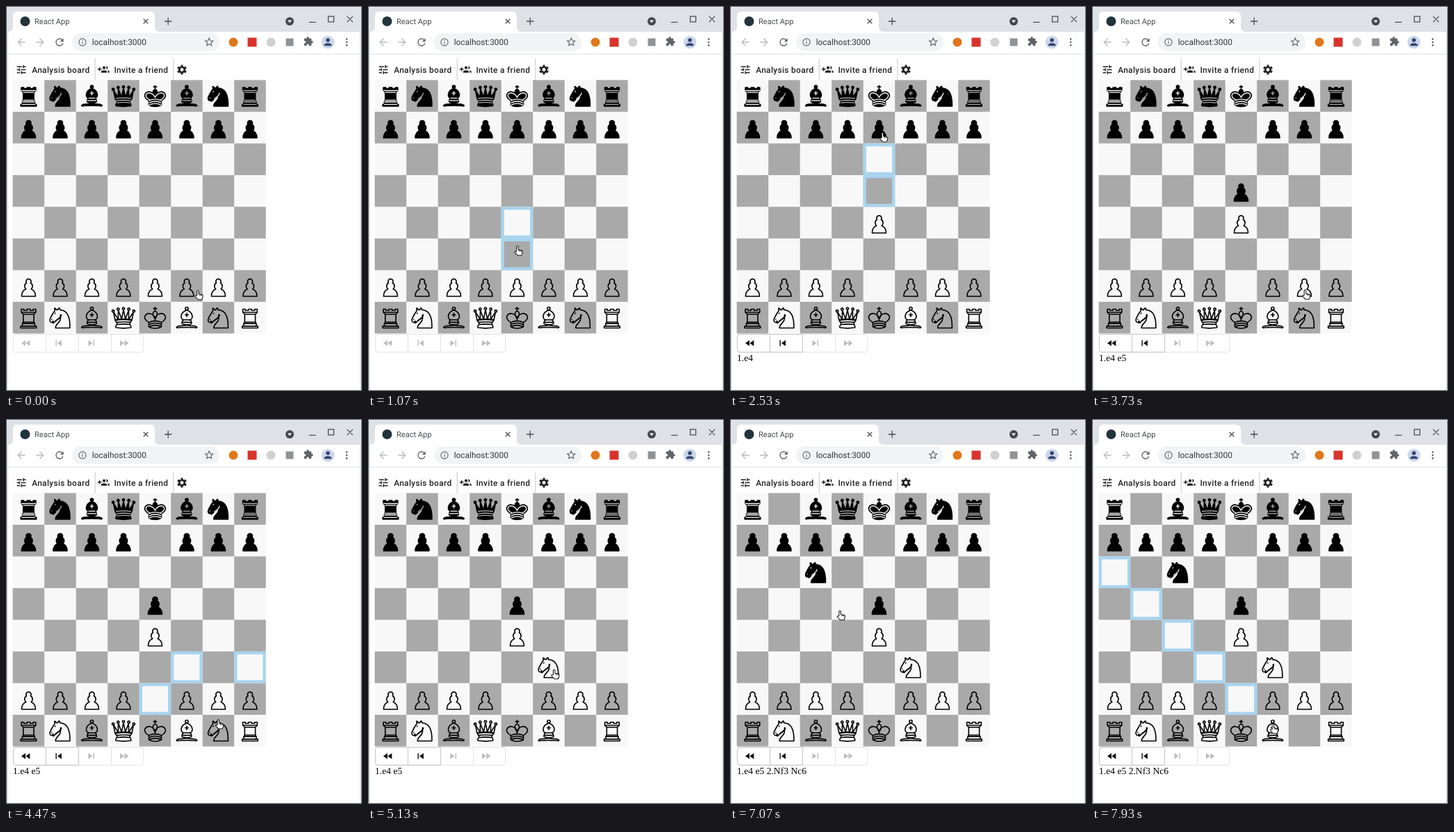
Write an HTML page that moves like this. It is 512 px wide and 553 px high and loops after 8000 ms.

```html
<!DOCTYPE html>
<html lang="en">
<head>
<meta charset="utf-8">
<title>Chess board</title>
<style>
html, body { margin: 0; width: 100%; height: 100%; overflow: hidden; background: #fff; }
svg { display: block; }
text { text-rendering: geometricPrecision; white-space: pre; }
.ui { font-family: Roboto, sans-serif; }
.button { font: 500 11.9px Roboto, sans-serif; letter-spacing: .34px; fill: #212121; }
#notation { font: 13.6px "Liberation Serif", serif; }
.line { fill: none; stroke: #4a4e52; stroke-width: 1.3; }
.piece { stroke: #000; stroke-width: 1.8; stroke-linecap: round; stroke-linejoin: round; }
.white, .detail { fill: none; }
.black .detail { stroke: currentColor; stroke-width: 1.5; }
</style>
</head>
<body>
<svg id="stage" width="512" height="553" viewBox="0 0 512 553">
  <!-- window frame and tab strip -->
  <rect width="512" height="553" fill="#dee1e6"/>
  <path d="M3 69H509V551H3zM3 37H509V69H3z" fill="#fff"/>
  <path d="M3 37q7 0 7-7V15q0-7 7-7H207q7 0 7 7v15q0 7 7 7z" fill="#fff"/>
  <path d="M3 69.1H509" stroke="#dcdee1"/>
  <rect x=".5" y=".5" width="511" height="552" fill="none" stroke="#4d5558"/>
  <circle cx="27.5" cy="22" r="7" fill="#21333b"/>
  <text class="ui" x="41" y="26" font-size="11.05" fill="#45494d">React App</text>
  <path class="line" d="M197.7 18.7l6.6 6.6m0-6.6l-6.6 6.6M228 22h10.4M233.2 16.8v10.4"/>
  <circle cx="408" cy="22" r="6" fill="#45494d"/>
  <path d="M405 20.6h6l-3 3.6z" fill="#fff"/>
  <path class="line" d="M436 23.3h9.5M463.5 14.8h8v8h-8zM490.6 14.9l8.2 8.2m0-8.2l-8.2 8.2"/>

  <!-- toolbar -->
  <rect x="95" y="39.3" width="212" height="25.4" rx="12.7" fill="#f1f3f4"/>
  <g fill="#5f6368">
    <path id="back" d="M20 11H7.83l5.59-5.59L12 4l-8 8 8 8 1.41-1.41L7.83 13H20z" fill="#babcbe" transform="translate(13.5 43.5) scale(.71)"/>
    <use href="#back" transform="matrix(-1 0 0 1 71 0)"/>
    <path d="M17.65 6.35A8 8 0 1 0 19.73 14h-2.08A6 6 0 1 1 12 6c1.66 0 3.14.69 4.22 1.78L13 11h7V4z" transform="translate(68.5 43.5) scale(.71)"/>
    <path d="M20.5 11H19V7c0-1.1-.9-2-2-2h-4V3.5a2.5 2.5 0 0 0-5 0V5H4c-1.1 0-2 .9-2 2v3.8h1.5a2.7 2.7 0 0 1 0 5.4H2V20c0 1.1.9 2 2 2h3.8v-1.5a2.7 2.7 0 0 1 5.4 0V22H17c1.1 0 2-.9 2-2v-4h1.5a2.5 2.5 0 0 0 0-5z" transform="translate(427.5 43.5) scale(.62)"/>
    <circle cx="490" cy="47.6" r="1.3"/><circle cx="490" cy="52" r="1.3"/><circle cx="490" cy="56.4" r="1.3"/>
  </g>
  <g fill="none" stroke="#5f6368" stroke-width="1.1">
    <circle cx="110" cy="52" r="5.1"/>
    <path d="M110 51.2v3.4M110 49v1.2"/>
    <path d="M12 4l2.4 5.2 5.6.6-4.2 3.8 1.2 5.6-5-2.9-5 2.9 1.2-5.6L4 9.8l5.6-.6z" stroke-width="1.6" transform="translate(283.8 43.3) scale(.7)"/>
  </g>
  <text class="ui" x="123.7" y="56.1" font-size="11.9" fill="#33373b">localhost:3000</text>
  <circle cx="327" cy="52" r="6.5" fill="#e2761b"/>
  <rect x="347.5" y="45.5" width="13" height="13" fill="#d9342b"/>
  <circle cx="381" cy="52" r="6.5" fill="#d0d0d0"/>
  <rect x="402.5" y="46.5" width="11" height="11" fill="#8f9396"/>
  <circle cx="463" cy="52" r="9.3" fill="#ccd7ee"/>
  <circle cx="463" cy="49" r="2.8" fill="#35456b"/>
  <path d="M457.4 57.2q0-4 5.6-4t5.6 4z" fill="#35456b"/>

  <!-- page buttons -->
  <path d="M128.2 75.5v31M240.9 75.5v31" stroke="#c6c6c6"/>
  <g fill="#212121">
    <path d="M3 17v2h6v-2H3zM3 5v2h10V5H3zm10 16v-2h8v-2h-8v-2h-2v6h2zM7 9v2H3v2h4v2h2V9H7zm14 4v-2H11v2h10zm-6-4h2V7h4V5h-4V3h-2v6z" transform="translate(13.6 83) scale(.708)"/>
    <g transform="translate(131.8 83) scale(.708)">
      <path d="M8 10H5V7H3v3H0v2h3v3h2v-3h3zM13 13c-2 0-6 1-6 3v2h12v-2c0-2-4-3-6-3zM19.6 13.2c.8.7 1.4 1.7 1.4 2.8v2h3v-2c0-1.5-2.4-2.5-4.4-2.8zM17.1 5.1a5 5 0 0 1 0 5.8 3 3 0 1 0 0-5.8z"/>
      <circle cx="13" cy="8" r="3"/>
    </g>
  </g>
  <g fill="none" stroke="#212121">
    <circle cx="253" cy="91.5" r="3.8" stroke-width="2.8"/>
    <circle cx="253" cy="91.5" r="5.9" stroke-width="2.2" pathLength="12" stroke-dasharray="1" stroke-dashoffset="-.5"/>
  </g>
  <text class="button" x="37.2" y="95.7">Analysis board</text>
  <text class="button" x="155.4" y="95.7">Invite a friend</text>

  <g id="squares"></g>
  <g id="marks" fill="none" stroke="#a8d4ef" stroke-width="4.2"></g>
  <g id="pieces"></g>

  <!-- history controls -->
  <g fill="none" stroke="#e2e2e2">
    <rect x="10.5" y="471.5" width="187.2" height="25.7" rx="3.5"/>
    <path d="M57.5 471.5v25.7m47-25.7v25.7m47-25.7v25.7"/>
    <path class="past" stroke="#c4c4c4" d="M104.5 471.5H14q-3.5 0-3.5 3.5v18.7q0 3.5 3.5 3.5H104.5zM57.5 471.5v25.7"/>
  </g>
  <g id="icons" fill="#bdbdbd"></g>
  <text id="notation" x="10" y="510"></text>

  <path id="hand" d="M3.2 8.2V2a1.1 1.1 0 0 1 2.2 0v4l4 .7q1.4.3 1.3 1.8l-.6 3.2-.8 1.9H4.6L1 9.3q-.4-1.2.8-1.2zM7 6.4v2M8.9 6.8v1.8" fill="#fff" stroke="#111" stroke-width=".9" stroke-linejoin="round"/>
</svg>
<script>
const LOOP = 8000, STEP = 1000 / 15;
const LEFT = 9.7, TOP = 106.4, CELL = 45.5;
const LIGHT = '#f8f8f8', DARK = '#a9a9a9';
const $ = id => document.getElementById(id);

function add(parent, tag, attrs, text = '') {
  const el = document.createElementNS('http://www.w3.org/2000/svg', tag);
  for (const key in attrs) el.setAttribute(key, attrs[key]);
  el.textContent = text;
  return parent.appendChild(el);
}

// time, from, to, notation after the move
const moves = [
  [1600, 'e2', 'e4', '1.e4'],
  [3400, 'e7', 'e5', '1.e4 e5'],
  [5130, 'g1', 'f3', '1.e4 e5 2.Nf3'],
  [6870, 'b8', 'c6', '1.e4 e5 2.Nf3 Nc6']
];
const NOTE_DELAY = 70;

// start, end, squares that can be reached
const hints = [
  [730, 1600, 'e3 e4'],
  [2530, 3400, 'e6 e5'],
  [4270, 5130, 'e2 f3 h3'],
  [6130, 6870, 'a6 c6'],
  [7870, 9000, 'a6 b5 c4 d3 e2']
];

// time, x, y of the pointer's centre
const path = [
  [0, 277.5, 415], [330, 216, 406], [670, 216, 406], [1070, 216.5, 351], [1400, 217, 322],
  [1800, 217, 322], [2070, 227, 252], [2270, 221, 188], [2530, 221, 188], [3200, 219, 266],
  [3400, 219, 266], [3730, 308, 414], [4000, 313, 450], [4400, 313, 450], [4870, 270.5, 368],
  [5130, 270.5, 368], [5530, 125, 194], [5600, 125, 194], [5930, 80.5, 132],
  [6130, 80.5, 132], [6600, 122, 222], [6870, 122, 222], [7600, 262, 445], [LOOP, 262, 445]
];

const ball = (x, y, r) => `M${x - r} ${y}a${r} ${r} 0 1 1 ${2 * r} 0a${r} ${r} 0 1 1 ${-2 * r} 0z`;

// outline and inner lines of each piece in a 45 unit box
const shapes = {
  p: ['M22.5 11.3a4 4 0 0 0-3.3 6.3c-2 1.2-3 3-3 5.2 0 2 .8 3.5 2.2 4.6-3 1.2-7 4.5-7 11.6h22.2c0-7.1-4-10.4-7-11.6 1.4-1.1 2.2-2.6 2.2-4.6 0-2.2-1-4-3-5.2a4 4 0 0 0-3.3-6.3z', ''],
  r: ['M10 39h25v-3H10zM12.5 36v-4h20v4zM14 29.5L12.5 32h20L31 29.5V17l3-3V9h-4v2h-5V9h-5v2h-5V9h-4v5l3 3z', 'M11.5 14h22M14.5 17h16M14.5 29.5h16M13 32h19M12.5 36h20'],
  n: ['M22 10c10.5 1 16.5 8 16 29H15c0-9 10-6.5 8-21M24 18c.4 2.9-5.5 7.4-8 9-3 2-2.8 4.3-5 4-1-.9 1.4-3 0-3-1 0 .2 1.2-1 2-1 0-4 1-4-4 0-2 6-12 6-12s1.9-1.9 2-3.5c-.7-1-.5-2-.5-3 1-1 3 2.5 3 2.5h2s.8-2 2.5-3c1 0 1 3 1 3', 'M24 18c.4 2.9-5.5 7.4-8 9M9 25.5v.1M14.7 15.2l-.4.7'],
  b: ['M9 36c3.4-1 10.1.4 13.5-2 3.4 2.4 10.1 1 13.5 2 0 0 1.6.5 3 2-.7 1-1.6 1-3 .5-3.4-1-10.1.5-13.5-1-3.4 1.5-10.1 0-13.5 1-1.4.5-2.3.5-3-.5 1.4-1.5 3-2 3-2zM15 32c2.5 2.5 12.5 2.5 15 0 .5-1.5 0-2 0-2 0-2.5-2.5-4-2.5-4 5.5-1.5 6-11.5-5-15.5-11 4-10.5 14-5 15.5 0 0-2.5 1.5-2.5 4 0 0-.5.5 0 2z' + ball(22.5, 8, 2.3), 'M17.5 26h10M15.5 30h14M22.5 15.5v5.5M20 18h5'],
  q: ['M9 26c8.5-1.5 21-1.5 27 0l2.5-12.5L31 25l-.3-14.1-5.2 13.6-3-14.5-3 14.5-5.2-13.6L14 25 6.5 13.5zc0 2 1.5 2 2.5 4 1 1.5 1 1 .5 3.5-1.5 1-1.5 2.5-1.5 2.5-1.5 1.5.5 2.5.5 2.5 6.5 1 16.5 1 23 0 0 0 1.5-1 0-2.5 0 0 .5-1.5-1-2.5-.5-2.5-.5-2 .5-3.5 1-2 2.5-2 2.5-4'
    + ball(6, 12, 1.8) + ball(14, 9, 1.8) + ball(22.5, 8, 1.8) + ball(31, 9, 1.8) + ball(39, 12, 1.8), 'M11 26.5q11.5-2 23 0M12 30q10.500-1.500 21 0M12.500 33.500q10-1.500 20 0'],
  k: ['M22.5 25s4.5-7.5 3-10.500c0 0-1-2.500-3-2.500s-3 2.500-3 2.500c-1.500 3 3 10.500 3 10.500M12.500 37c5.500 3.500 14.500 3.500 20 0v-7s9-4.500 6-10.500c-4-6.500-13.500-3.500-16 4V27v-3.500c-2.500-7.500-12-10.500-16-4-3 6 6 10.500 6 10.500zM22.500 11.600V6M20 8h5', 'M13 30c5.500-3 13.500-3 19 0M13 33.500c5.500-3 13.500-3 19 0M13 37c5.500-3 13.500-3 19 0']
};
// light contour inside the dark king
const lobes = 'M31.5 28.500s7.500-3.500 5.400-8.500C33.500 15 25 18.500 22.500 25 20 18.500 11.500 15 8.100 20c-2.100 5 5.400 8.500 5.400 8.500';

const column = square => square.charCodeAt(0) - 97;
const corner = square => [LEFT + CELL * column(square), TOP + CELL * (8 - square[1])];
const shade = square => (column(square) + +square[1]) % 2 ? DARK : LIGHT;

function addPiece(kind, home, black) {
  const [outline, detail] = shapes[kind];
  const el = add($('pieces'), 'g', { class: 'piece ' + (black ? 'black' : 'white') });
  add(el, 'path', { d: outline });
  add(el, 'path', { class: 'detail', d: detail + (black && kind === 'k' ? lobes : '') });
  return { home, el };
}

const pieces = [];
const ranks = { 8: 'rnbqkbnr', 7: 'pppppppp', 2: 'pppppppp', 1: 'rnbqkbnr' };
add($('squares'), 'rect', { x: LEFT, y: TOP, width: 8 * CELL, height: 8 * CELL, fill: LIGHT });
for (let rank = 8; rank; rank--) {
  for (let file = 0; file < 8; file++) {
    const home = 'abcdefgh'[file] + rank, [x, y] = corner(home);
    if (shade(home) === DARK) add($('squares'), 'rect', { x, y, width: CELL, height: CELL, fill: DARK });
    if (ranks[rank]) pieces.push(addPiece(ranks[rank][file], home, rank > 4));
  }
}

const marks = hints.map(([start, end, squares]) => {
  const group = add($('marks'), 'g', {});
  for (const square of squares.split(' ')) {
    const [x, y] = corner(square);
    add(group, 'rect', { x: x + 2.1, y: y + 2.1, width: CELL - 4.2, height: CELL - 4.2 });
  }
  return { start, end, group };
});

const icons = [
  'M11 18V6l-8.5 6zm.5-6l8.5 6V6z',
  'M6 6h2v12H6zm3.5 6l8.5 6V6z',
  'M6 18l8.5-6L6 6zM16 6v12h2V6z',
  'M4 18l8.5-6L4 6zm9-12v12l8.5-6z'
].map((d, i) => add($('icons'), 'path', {
  d, transform: `translate(${20.2 + 47 * i} 475.7) scale(.708)`
}));

function pointer(t) {
  const i = Math.max(1, path.findIndex(p => p[0] >= t));
  const [t0, x0, y0] = path[i - 1], [t1, x1, y1] = path[i];
  const k = (t - t0) / (t1 - t0);
  return [x0 + (x1 - x0) * k, y0 + (y1 - y0) * k];
}

function draw(t) {
  for (const { home, el } of pieces) {
    const move = moves.find(m => m[1] === home && t >= m[0]);
    const square = move ? move[2] : home, [x, y] = corner(square);
    el.setAttribute('transform', `translate(${x + CELL / 2} ${y + CELL / 2}) scale(.9) translate(-22.5 -22.5)`);
    el.style.color = shade(square);
  }
  for (const { start, end, group } of marks) {
    group.style.display = t >= start && t < end ? '' : 'none';
  }
  const noted = moves.filter(m => t >= m[0] + NOTE_DELAY - 5).pop();
  $('notation').textContent = noted ? noted[3] : '';
  document.querySelector('.past').style.display = noted ? '' : 'none';
  for (const icon of icons.slice(0, 2)) icon.style.fill = noted ? '#111' : '';
  const [x, y] = pointer(t);
  $('hand').setAttribute('transform', `translate(${x} ${y}) scale(1.15 1.05) translate(-5.7 -7.2)`);
}

function tick() {
  const t = performance.now() % LOOP;
  // the picture advances fifteen times a second
  draw(Math.min(LOOP, Math.floor((t + 5) / STEP) * STEP));
  requestAnimationFrame(tick);
}
tick();
</script>
</body>
</html>
```
